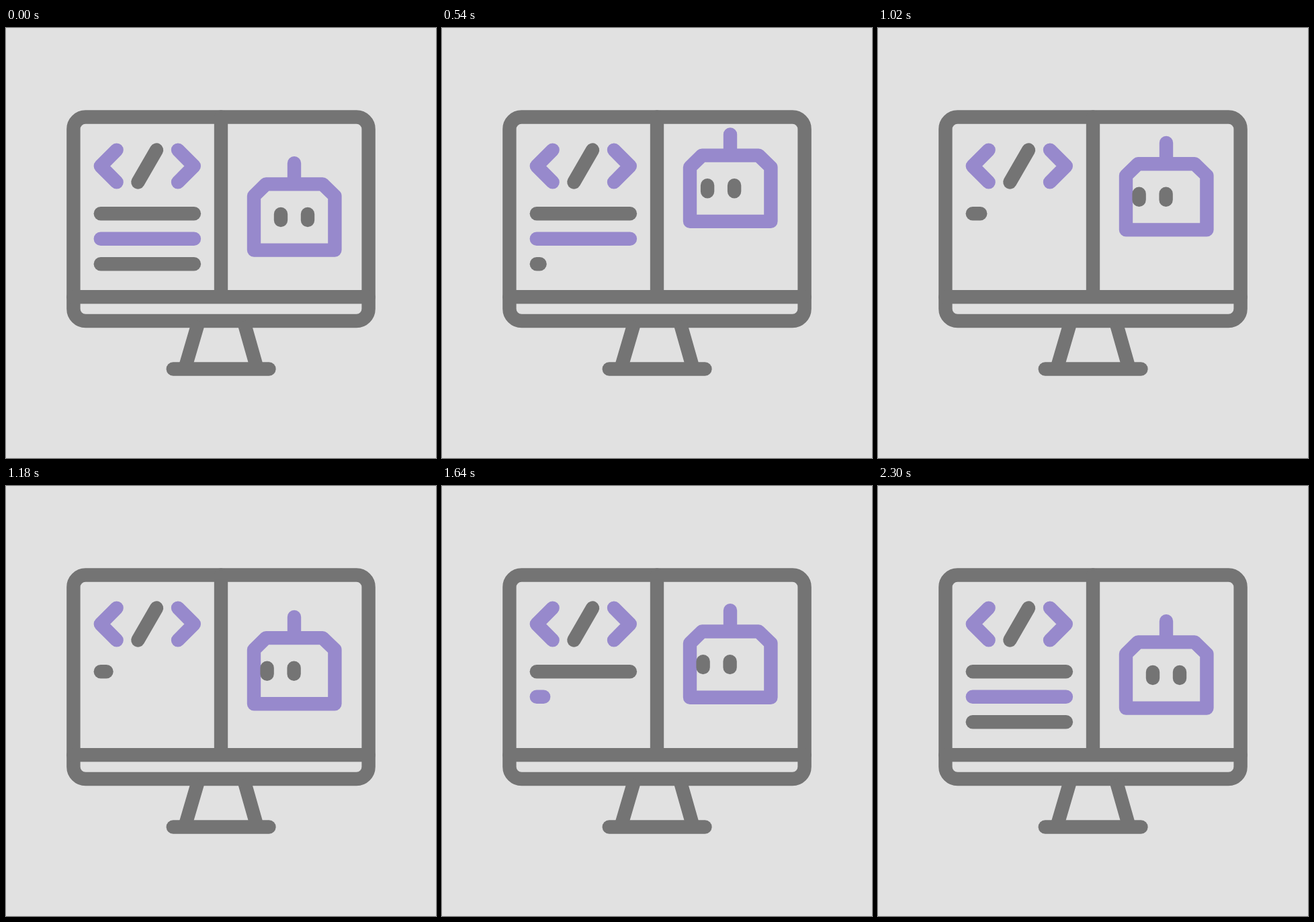
An HTML page for the animation above (2400 ms loop, 640x640 px).

```html
<!DOCTYPE html>
<html lang="en">
<head>
<meta charset="utf-8">
<title>Coding robot</title>
<style>
  html, body { margin: 0; width: 100%; height: 100%; overflow: hidden; background: #e1e1e1; }
  svg { display: block; width: 100vw; height: 100vh; }
  .ink { fill: none; stroke: #747474; stroke-width: 20.4; stroke-linecap: round; stroke-linejoin: round; }
  .accent { stroke: #9789cc; }
</style>
</head>
<body>
<svg viewBox="0 0 640 640">
  <rect width="640" height="640" fill="#e1e1e1"/>
  <g class="ink">
    <rect x="100.4" y="132.5" width="439.2" height="303.5" rx="18"/>
    <path d="M320 132.5V400.3M100.4 400.3H539.6"/>
    <path d="M287 436L266.2 507M353.6 436L373.8 507" stroke-linecap="butt"/>
    <path d="M248.8 507.5H391.4"/>
    <path class="accent" d="M164.6 181.6L140.8 205.5L164.6 229.4M256 181.6L279.8 205.5L256 229.4"/>
    <path d="M224 181.6L196.4 229.4"/>
    <path class="line"/>
    <path class="line accent"/>
    <path class="line"/>
    <g id="robot">
      <path class="accent" d="M429 201.2V232.4M369 330.6V250L387 232.4H471.2L489.4 250V330.6Z"/>
      <path id="eyes" d="M409 277V286M449 277V286"/>
    </g>
  </g>
</svg>
<script>
const LOOP = 2400, HALF = 1150, END = 2300;
const LEFT = 140.8, LEN = 139.1, TOTAL = LEN * 3, MIN = 8.5;
const lines = [...document.querySelectorAll('.line')];
const robot = document.getElementById('robot');
const eyes = document.getElementById('eyes');

// cubic-bezier easing, solved by bisection
function bezier(x1, y1, x2, y2) {
  const at = (a, b, s) => 3 * a * s * (1 - s) ** 2 + 3 * b * s * s * (1 - s) + s ** 3;
  return x => {
    if (x <= 0) return 0;
    if (x >= 1) return 1;
    let lo = 0, hi = 1;
    for (let i = 0; i < 30; i++) {
      const mid = (lo + hi) / 2;
      if (at(x1, x2, mid) < x) lo = mid; else hi = mid;
    }
    return at(y1, y2, lo);
  };
}

const erase = bezier(0.836, 0, 0.178, 1);
const write = bezier(0.79, 0, 0.08, 1);
const rise = bezier(0.7, 0, 0.3, 1);
const hop = bezier(0.8, 0, 0.2, 1);
const fall = bezier(0.4, 0, 0.95, 0.35);
const glance = bezier(0.33, 0, 0.67, 1);

const span = (t, from, to, ease) => ease((t - from) / (to - from));

function draw(t) {
  const shown = 1 - span(t, 0, HALF, erase) + span(t, HALF, END, write);
  const length = MIN + (TOTAL - MIN) * shown;
  lines.forEach((line, i) => {
    const part = Math.min(LEN, length - i * LEN);
    const y = 276.3 + i * 37.5;
    line.setAttribute('d', part > 0 ? `M${LEFT} ${y}H${LEFT + part}` : '');
  });

  const big = span(t, 0, 645, rise) - span(t, 645, 1192, fall);
  const small = span(t, 1192, 1620, hop) - span(t, 1620, 1850, fall);
  robot.setAttribute('transform', `translate(0 ${-43.7 * big - 16 * small})`);

  const look = span(t, 260, 710, glance) - span(t, 1860, END, glance);
  eyes.setAttribute('transform', `translate(${-20.4 * look} 0)`);
}

const start = performance.now();
function tick() {
  draw((performance.now() - start) % LOOP);
  requestAnimationFrame(tick);
}
draw(0);
requestAnimationFrame(tick);
</script>
</body>
</html>
```
